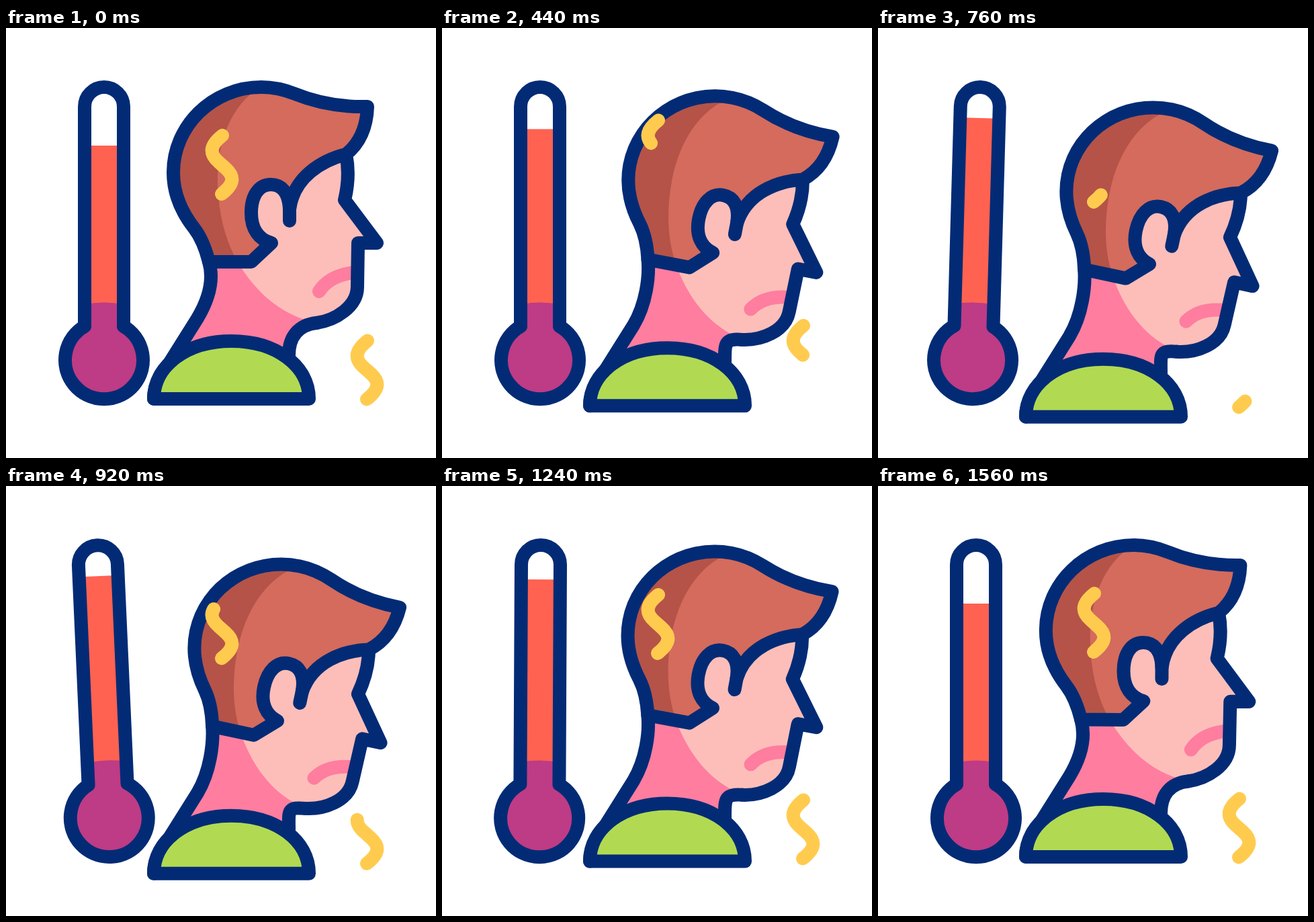
These frames come from a looping animation (640x640 px, 1600 ms). An HTML page:

```html
<!DOCTYPE html>
<html lang="en">
<head>
<meta charset="utf-8">
<title>Fever</title>
<style>
  html, body { margin: 0; width: 100%; height: 100%; overflow: hidden; background: #fff; }
  svg { display: block; width: 100vw; height: 100vh; }
  .line { fill: none; stroke: #032b75; stroke-width: 20; stroke-linecap: round; stroke-linejoin: round; }
  .shirt { fill: #b1da52; }
  .skin { fill: #fdbeb9; }
  .shade { fill: #ff7d9f; }
  .mouth { fill: none; stroke: #ff7d9f; stroke-width: 20; stroke-linecap: round; }
  .wave { fill: none; stroke: #ffcb4f; stroke-width: 20; stroke-linecap: round; stroke-linejoin: round; }
</style>
</head>
<body>
<svg viewBox="0 0 640 640">
  <defs>
    <path id="hair" d="M302 348C297 328 290 311 280 298C262 275 249 246 249 215C249 146 307 88 380 88C397 88 415 92 430 98C462 111 495 118 538 117C537 148 526 172 506 188C470 197 428 222 422 270C421 243 409 233 394 233C376 233 365 250 365 275C365 300 377 315 395 320L365 348Z"/>
    <clipPath id="hairClip"><use href="#hair"/></clipPath>
  </defs>

  <g id="thermo">
    <rect id="fluid" x="120" y="175" width="52" height="240" fill="#ff6251"/>
    <path d="M117 411Q146 406 175 411V444A58 58 0 1 1 117 444Z" fill="#be3b86"/>
    <path class="line" d="M117 444V117A29 29 0 0 1 175 117V444A58 58 0 1 1 117 444Z"/>
  </g>

  <g id="body">
    <path id="neck" class="shade"/>
    <g id="head">
      <path class="skin" d="M340 340C365 385 400 420 445 434L462 439C490 435 523 415 523 385L524 320H552L504 256C509 235 511 215 507 197L440 150L350 250Z"/>
      <path class="mouth" d="M466 392C475 378 492 367 518 364"/>
      <use href="#hair" fill="#d46b5d"/>
      <path clip-path="url(#hairClip)" fill="#b55348" d="M378 88C335 115 315 168 315 225C315 270 325 315 345 348H230V80Z"/>
      <path class="line" d="M506 188C511 212 509 235 504 256L552 320H524L523 385C523 415 490 435 462 439"/>
      <use href="#hair" class="line"/>
      <path class="line" d="M422 260V287"/>
    </g>
    <path id="nape" class="line"/>
    <path id="throat" class="line"/>
    <path class="line shirt" d="M220 552C220 502 270 466 335.500 466C401 466 451 502 451 552Z"/>
  </g>

  <path class="wave" pathLength="1" d="M322 160C303 175 302 187 317 200L326 208C341 221 340 232 321 247"/>
  <path class="wave" pathLength="1" d="M538 465.500C519 480.500 518 492.500 533 505.500L542 513.500C557 526.500 556 537.500 537 552.500"/>
</svg>
<script>
const LOOP = 1600, STEP = 40;
const PIVOT = [377, 365];
const $ = id => document.getElementById(id);
const waves = [...document.querySelectorAll('.wave')];

// Sine ease from 0 to 1 between two times
const ease = (t, from, to) => {
  const p = Math.min(1, Math.max(0, (t - from) / (to - from)));
  return (1 - Math.cos(Math.PI * p)) / 2;
};

// Eased track through [time, value] keys
const track = (t, keys) => keys.slice(1).reduce(
  (v, [time, value], i) => v + (value - keys[i][1]) * ease(t, keys[i][0], time),
  keys[0][1]);

const TILT = [[440, 0], [520, -2.4], [685, 6.3], [865, -6.3], [1015, 6.3], [1275, 0]];
const NOD = [[80, 0], [533, 12], [1130, 12], [1610, 0]];
const SINK = [[175, 0], [800, 27], [1455, 0]];
const LEVEL = [[150, 175], [665, 134], [1150, 134], [1540, 175]];
const TRIM = [
  { out: [245, 580], back: [680, 1010] },
  { out: [288, 592], back: [680, 1040] }
];

function turn(deg) {
  const a = deg * Math.PI / 180, c = Math.cos(a), s = Math.sin(a);
  return (x, y) => {
    const u = x - PIVOT[0], v = y - PIVOT[1];
    return `${(PIVOT[0] + u * c - v * s).toFixed(2)} ${(PIVOT[1] + u * s + v * c).toFixed(2)} `;
  };
}

// The neck stretches between the turning head and the shoulders
function drawNeck(deg) {
  const r = turn(deg);
  const nape = `M${r(302, 348)}C${r(309, 372)}304 400 285 432L263 467`;
  $('nape').setAttribute('d', `${nape}L236 510C226 524 220 535 220 552`);
  $('throat').setAttribute('d', `M${r(462, 439)}C${r(435, 442)}421 460 421 487`);
  $('neck').setAttribute('d',
    `${nape}V492H421V487C421 460 ${r(435, 442)}${r(462, 439)}L${r(445, 360)}Z`);
}

function drawWave(wave, t, { out, back }) {
  const leaving = t < 640;
  const start = leaving ? 0 : 1 - ease(t, ...back);
  const end = leaving ? 1 - ease(t, ...out) : 1;
  const dy = leaving ? -30 * ease(t, 120, 600) : 12.2 * (1 - ease(t, 680, 1440));
  wave.style.display = end - start < 0.02 ? 'none' : '';
  wave.setAttribute('transform', `translate(0 ${dy})`);
  wave.setAttribute('stroke-dasharray', `${end - start + (end === 1 ? 0.1 : 0)} 3`);
  wave.setAttribute('stroke-dashoffset', -start);
}

function draw(now) {
  const t = Math.floor(now % LOOP / STEP) * STEP;
  const nod = track(t, NOD), level = track(t, LEVEL);
  $('thermo').setAttribute('transform', `rotate(${track(t, TILT)} 146 320)`);
  $('fluid').setAttribute('y', level);
  $('fluid').setAttribute('height', 415 - level);
  $('body').setAttribute('transform', `translate(0 ${track(t, SINK)})`);
  $('head').setAttribute('transform', `rotate(${nod} ${PIVOT})`);
  drawNeck(nod);
  waves.forEach((w, i) => drawWave(w, t, TRIM[i]));
}

let begin;
function tick(now) {
  begin ??= now;
  draw(now - begin);
  requestAnimationFrame(tick);
}
draw(0);
requestAnimationFrame(tick);
</script>
</body>
</html>
```
